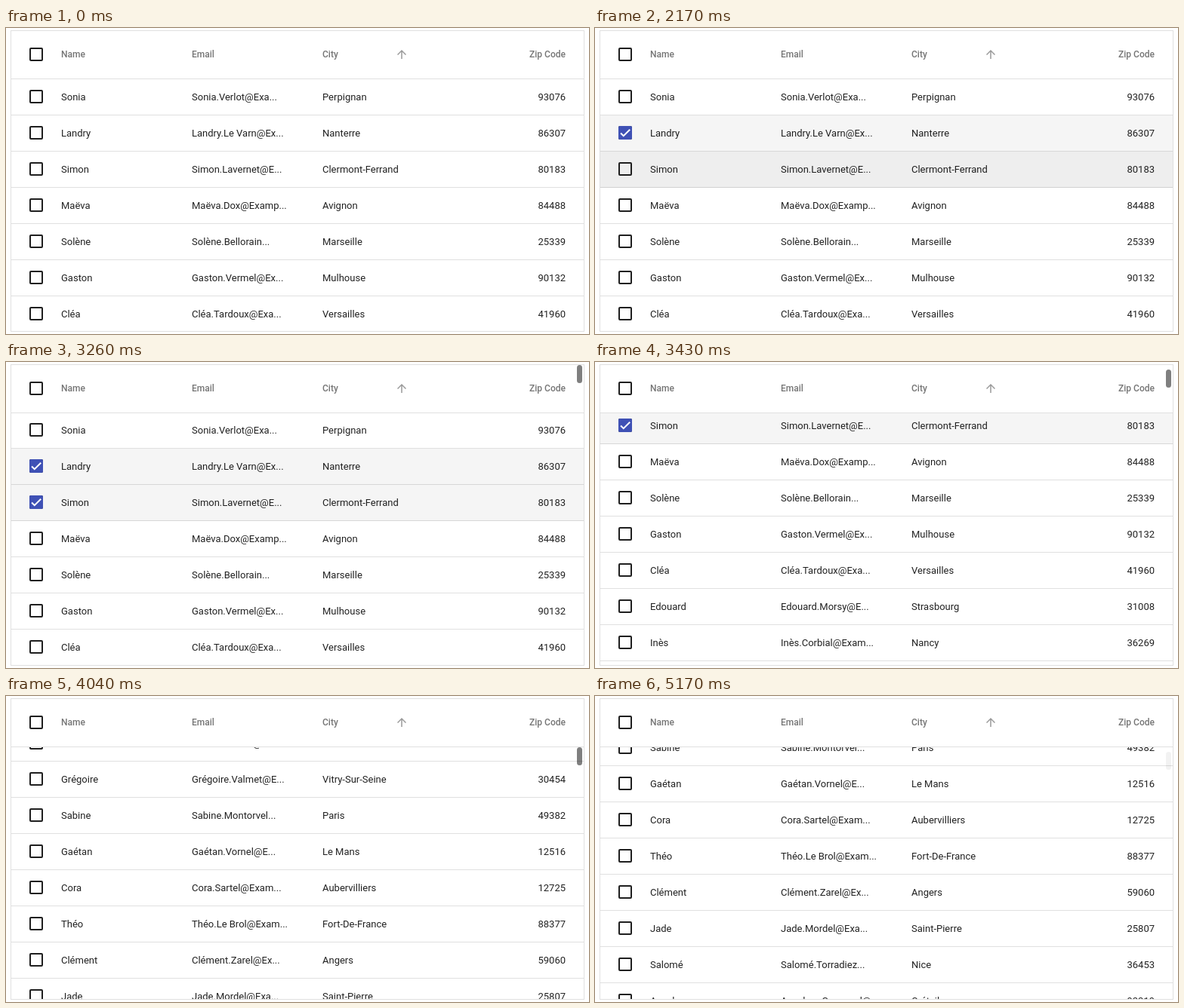
These frames come from a looping animation (772 by 406 pixels, 6270 ms). An HTML page with a canvas:

```html
<!DOCTYPE html>
<html lang="fr">
<head>
<meta charset="utf-8">
<title>Data table</title>
<style>
html, body { margin: 0; width: 100%; height: 100%; overflow: hidden; background: #fff; }
canvas { display: block; }
</style>
</head>
<body>
<canvas id="stage" width="772" height="406"></canvas>
<script>
const ctx = document.getElementById('stage').getContext('2d');
const LOOP = 6270, ROW = 48, TOP = 68;
const LINE = 'rgba(0,0,0,.12)', INK = 'rgba(0,0,0,.87)';

// first name . rest of the cut address | city | zip
const rows = `Sonia.Verlot@Exa|Perpignan|93076
Landry.Le Varn@Ex|Nanterre|86307
Simon.Lavernet@E|Clermont-Ferrand|80183
Maëva.Dox@Examp|Avignon|84488
Solène.Bellorain|Marseille|25339
Gaston.Vermel@Ex|Mulhouse|90132
Cléa.Tardoux@Exa|Versailles|41960
Edouard.Morsy@E|Strasbourg|31008
Inès.Corbial@Exam|Nancy|36269
Gaspard.Ormel@Ex|Toulon|71842
Tess.Vaubrin@Exa|Limoges|28415
Basile.Cordol@Ex|Dijon|60937
Anouk.Perlin@Exa|Amiens|17520
Robin.Le Trax@Ex|Orléans|83264
Ninon.Dalbert@Ex|Bordeaux|45718
Valère.Gantel@Ex|Tourcoing|92051
Yves.Daumarel@E|Rennes|59683
Romy.Orvin@Examp|Angers|12774
Noam.Tiro@Exam|Caen|45294
Ada.Norvel@Exam|Rueil-Malmaison|79519
Eloi.Brissol@Exam|Asnières-Sur-Seine|64409
Héloïse.Darne@Ex|Reims|62116
Grégoire.Valmet@E|Vitry-Sur-Seine|30454
Sabine.Montorvel|Paris|49382
Gaétan.Vornel@E|Le Mans|12516
Cora.Sartel@Exam|Aubervilliers|12725
Théo.Le Brol@Exam|Fort-De-France|88377
Clément.Zarel@Ex|Angers|59060
Jade.Mordel@Exa|Saint-Pierre|25807
Salomé.Torradiez|Nice|36453
Anselme.Garmond@|Créteil|92219`.split('\n').map(line => {
  const [mail, city, zip] = line.split('|');
  return { name: mail.split('.')[0], mail: mail + '...', city, zip };
});

const clicks = { 1: 1650, 2: 2610 };
const hovers = [
  [1, 1650, 2080], [2, 2080, 2870], [3, 2870, 3000],
  [4, 3000, 3130], [5, 3130, 3215], [30, 4610, 4650]
];

const clamp = v => Math.max(0, Math.min(1, v));

function tick(t) {
  const at = k => 3260 + 10 * Math.round(4.35 * k);
  let k = Math.floor((t - 3260) / 43.5) + 1;
  while (at(k) > t) k--;
  return Math.max(0, at(k));
}

// Flick: speed up, fast stretch, then friction
function scrollAt(t) {
  if (t < 3240) return 0;
  if (t < 3430) return Math.round(103 * ((t - 3240) / 190) ** 2);
  if (t < 3740) {
    const d = 310, u = (t - 3430) / d, v = 1 - u;
    const p = 103 + 1.2 * d / 3, q = 774 - 1.54 * d / 3;
    return Math.round(103 * v ** 3 + 3 * p * u * v * v + 3 * q * u * u * v + 774 * u ** 3);
  }
  if (t < 4480) return Math.round(1140 - 366 * Math.exp((3740 - t) / 237));
  return 1127;
}

function rect(x, y, w, h, color) {
  ctx.fillStyle = color;
  ctx.fillRect(x, y, w, h);
}

function text(str, x, y, align = 'left') {
  ctx.textAlign = align;
  ctx.fillText(str, x, y);
}

function roundBox(x, y, w, h, r) {
  ctx.beginPath();
  ctx.roundRect(x, y, w, h, r);
}

function checkbox(y, age = -1) {
  ctx.lineWidth = 2;
  ctx.strokeStyle = '#1f1f1f';
  roundBox(32, y + 1, 16, 16, 1);
  ctx.stroke();
  if (age < 0) return;

  ctx.globalAlpha = clamp((age + 40) / 90);
  ctx.fillStyle = '#3f51b5';
  roundBox(31, y, 18, 18, 2);
  ctx.fill();
  ctx.globalAlpha = 1;

  ctx.save();
  ctx.translate(31, y);
  ctx.scale(.75, .75);
  ctx.beginPath();
  ctx.moveTo(4.1, 12.7);
  ctx.lineTo(9, 17.6);
  ctx.lineTo(20.3, 6.3);
  ctx.strokeStyle = '#fff';
  ctx.lineWidth = 2.67;
  ctx.setLineDash([22.91 * clamp(age / 130), 30]);
  ctx.stroke();
  ctx.restore();
}

function ripple(y, age) {
  if (age < 0 || age >= 500) return;
  const grow = 1 - (1 - clamp((age + 10) / 150)) ** 3;
  ctx.fillStyle = `rgba(0,0,0,${.08 * (1 - clamp((age - 200) / 300))})`;
  ctx.beginPath();
  ctx.arc(40, y, 24 * grow, 0, 7);
  ctx.fill();
}

function header() {
  rect(7, 4, 758, 63, '#fff');
  rect(7, 67, 758, 1, '#e0e0e0');
  checkbox(26);
  ctx.font = '500 12px Roboto, sans-serif';
  ctx.fillStyle = 'rgba(0,0,0,.54)';
  text('Name', 73, 39);
  text('Email', 246, 39);
  text('City', 419, 39);
  text('Zip Code', 741, 39, 'right');

  ctx.save();
  ctx.translate(515, 26);
  ctx.scale(.75, .75);
  ctx.fillStyle = 'rgba(0,0,0,.4)';
  ctx.fill(new Path2D('M4 12l1.41 1.41L11 7.83V20h2V7.83l5.58 5.59L20 12l-8-8-8 8z'));
  ctx.restore();
}

function body(t, scroll) {
  const hover = (hovers.find(([, from, to]) => t >= from && t < to) || [-1])[0];
  const visible = rows.map((row, i) => ({ row, i, y: TOP + ROW * i - scroll }))
    .filter(({ y }) => y > TOP - ROW && y < 402);
  const age = i => i in clicks ? t - clicks[i] : -1;

  ctx.save();
  ctx.beginPath();
  ctx.rect(7, TOP, 758, 402 - TOP);
  ctx.clip();
  for (const { i, y } of visible) {
    const back = i === hover ? '#eee' : age(i) >= 85 ? '#f5f5f5' : '#fff';
    rect(7, y, 758, ROW, back);
    rect(7, y + ROW - 1, 758, 1, LINE);
  }
  for (const { row, i, y } of visible) {
    ripple(y + 23, age(i));
    checkbox(y + 14, age(i) - 85);
    ctx.font = '13px Roboto, sans-serif';
    ctx.fillStyle = INK;
    text(row.name, 73, y + 28);
    text(row.mail, 246, y + 28);
    text(row.city, 419, y + 28);
    text(row.zip, 741, y + 28, 'right');
  }
  ctx.restore();
}

function scrollbar(t, scroll) {
  if (t < 3260) return;
  const alpha = t < 5040 ? .5 : .5 - .45 * clamp((t - 4997) / 173);
  ctx.fillStyle = `rgba(0,0,0,${alpha})`;
  roundBox(756, Math.floor(4 + scroll * .0625), 7, 24, 3.5);
  ctx.fill();
}

function draw() {
  const t = tick(performance.now() % LOOP);
  const scroll = scrollAt(t);
  rect(0, 0, 772, 406, '#fff');
  body(t, scroll);
  header();
  ctx.strokeStyle = '#e0e0e0';
  ctx.lineWidth = 1;
  ctx.strokeRect(6.5, 3.5, 759, 399);
  scrollbar(t, scroll);
  requestAnimationFrame(draw);
}
draw();
</script>
</body>
</html>
```
